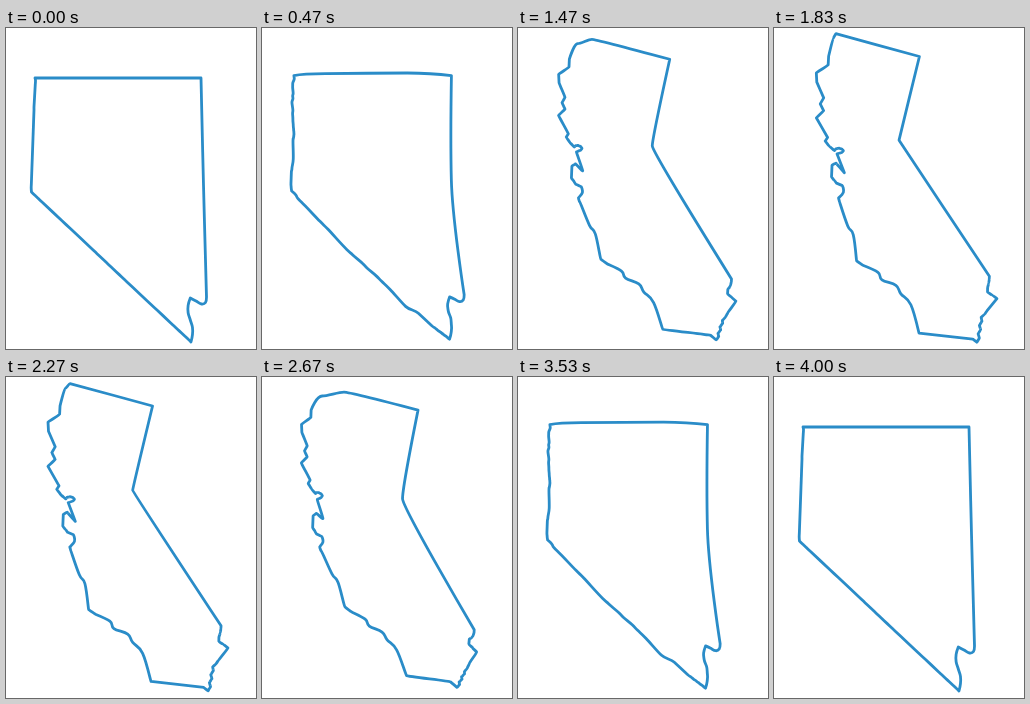
An HTML page for the animation above (4.03 s loop, 250 by 321 pixels).

```html
<!DOCTYPE html>
<html lang="en">
<head>
<meta charset="utf-8">
<title>Outline morph</title>
<style>
  html, body { margin: 0; width: 100%; height: 100%; overflow: hidden; background: #fff; }
  svg { display: block; width: 250px; height: 321px; }
  path { fill: none; stroke: #2a8cc8; stroke-width: 2.8; stroke-linejoin: round; stroke-linecap: round; }
</style>
</head>
<body>
<svg viewBox="0 0 250 321"><path id="outline"/></svg>
<script>
const HALF = 2000, LOOP = 4030;
const nodes = [];
const mix = (a, b, p) => [a[0] + (b[0] - a[0]) * p, a[1] + (b[1] - a[1]) * p];
const dist = (a, b) => Math.hypot(b[0] - a[0], b[1] - a[1]);

// A vertex at a in the first shape and at b in the second.
// "corner" is sharp in both shapes, "side" is sharp in the second, "round" in neither.
const add = (a, b, kind = "side") => nodes.push({ a, b, kind });

// Spreads a stretch of the second shape over a straight side of the first,
// in proportion to its length.
function run(from, to, keys, kind = "side") {
  const sums = [0];
  keys.slice(1).forEach((k, i) => sums.push(sums[i] + dist(keys[i], k)));
  const last = keys.length - 1;
  keys.forEach((b, i) => {
    const inner = i > 0 && i < last;
    add(mix(from, to, sums[i] / sums[last]), b, inner ? kind : "side");
  });
}

const range = (n, f) => Array.from({ length: n }, (_, i) => f(i));

// West side: north coast, then the bay with its upper lobe
add([29, 50], [55, 28], "corner");
run([29.5, 52.5], [28, 79], [
  [54.5, 37], [42.5, 44.5], [43, 54], [50, 70], [46.5, 76], [50, 83], [42.5, 90], [54, 110]
]);
const lobe = range(7, i => {
  const angle = Math.PI * (1 + i / 4);
  return [65.5 + 4.5 * Math.cos(angle), 123 + 2.5 * Math.sin(angle)];
});
run([28, 82], [25.2, 160], [
  [51.5, 113.5], [56, 119], ...lobe,
  [63.5, 126], [71, 145], [62.5, 135], [58.5, 137], [58, 149], [61, 152.5]
]);
add([25.5, 164], [63, 155], "corner");

// Diagonal side: central and south coast, border, river
run([28, 166.5], [32, 170.2], [[69, 157.5], [70, 164], [65, 170]], "round");
run([36, 174], [85, 220], [[66, 174], [74, 198], [79.5, 207], [82.5, 233]], "round");
run([91, 225.7], [143.4, 275], [
  [89, 237.5], [104, 244.5], [108, 252], [122, 257.5], [127, 266], [137, 277], [145, 305.5]
], "round");
add([151, 282], [199.5, 311.5]);
const zigzag = range(6, i => {
  const [x, y] = mix([204, 314.5], [207, 293], i / 5);
  return [x + (i % 2 ? 1.3 : -0.6), y];
});
run([165, 295.2], [182, 311], zigzag);
add([185, 314], [207.5, 289], "corner");

// River bend: one wave up to the hook
const bend = [[211, 286], [213.5, 282.5], [223.5, 270.2], [219, 267], [214, 264], [214, 260]];
bend.forEach((b, i) => {
  const u = (i + 1) / 6;
  add([184.3 + 2.5 * Math.sin(2 * Math.PI * u), 314 - 44 * u], b, u < 1 ? "side" : "corner");
});
add([190, 273], [214.3, 258]);
add([195.5, 276], [215, 255]);
add([199.5, 274.5], [215.5, 251]);
add([200.5, 269], [215.6, 248], "corner");

// East and north sides
add([197.5, 157], [124, 111.5]);
add([195, 50], [144.7, 28.2], "corner");
add([156, 50], [60.5, 5]);
add([64, 50], [59, 10]);

// Curve handle of vertex i in one shape, towards its next (1) or previous (-1) neighbour.
const at = i => nodes[(i + nodes.length) % nodes.length];
function handle(shape, i, dir) {
  const { [shape]: point, kind } = at(i);
  const sharp = kind === "corner" || (shape === "b" && kind === "side");
  if (sharp) return point;
  const prev = at(i - dir)[shape], next = at(i + dir)[shape];
  return [point[0] + (next[0] - prev[0]) / 5, point[1] + (next[1] - prev[1]) / 5];
}
const handles = (i, dir) => [handle("a", i, dir), handle("b", i, dir)];
const segments = nodes.map((_, i) => {
  const end = at(i + 1);
  return [handles(i, 1), handles(i + 1, -1), [end.a, end.b]];
});

const outline = document.getElementById("outline");
const easeInOut = t => t < 0.5 ? 2 * t * t : 1 - 2 * (1 - t) * (1 - t);

function draw(now) {
  const t = Math.max(0, 1 - Math.abs(now % LOOP - HALF) / HALF);
  const p = easeInOut(t);
  const point = ([a, b]) => mix(a, b, p).map(v => v.toFixed(2)).join(" ");
  outline.setAttribute("d",
    "M" + point([nodes[0].a, nodes[0].b]) +
    segments.map(s => "C" + s.map(point).join(" ")).join("") + "Z");
}

const start = performance.now();
function tick() {
  draw(performance.now() - start);
  requestAnimationFrame(tick);
}
tick();
</script>
</body>
</html>
```
